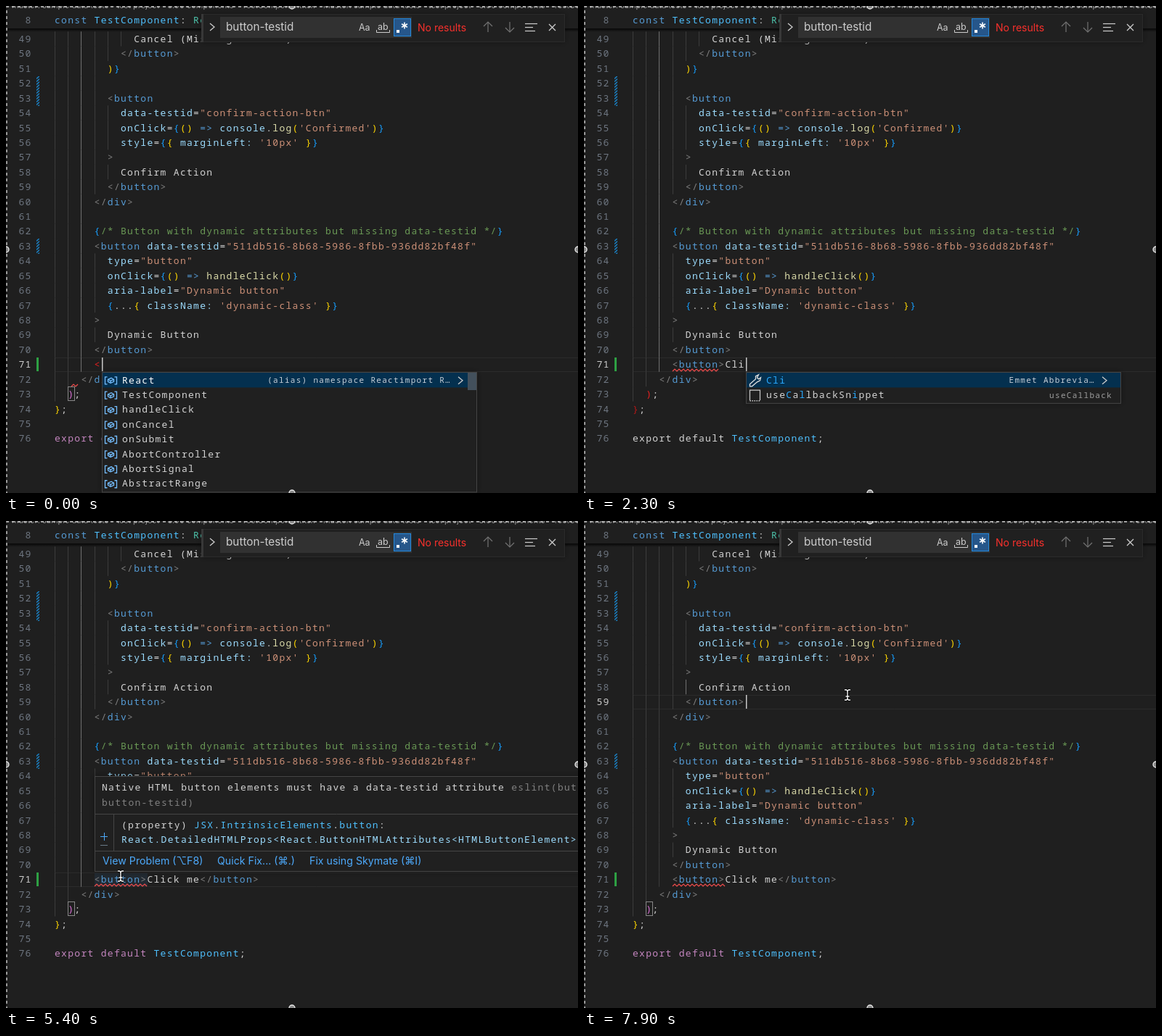
Animation of 788x672 px, one loop 8000 ms. Source, as an HTML page with a canvas:

```html
<!DOCTYPE html>
<html lang="en">
<head>
<meta charset="utf-8">
<title>Code editor</title>
<style>
  html, body { margin: 0; width: 788px; height: 672px; overflow: hidden; background: #1f1f1f; }
  canvas { display: block; }
</style>
</head>
<body>
<canvas id="stage" width="788" height="672"></canvas>
<script>
const ctx = document.getElementById('stage').getContext('2d');
const LEFT = 67, CW = 9.1, LH = 20.42, LOOP = 8000;
const MONO = '"Noto Sans Mono", "DejaVu Sans Mono", monospace';
const SANS = 'Inter, "Open Sans", "DejaVu Sans", sans-serif';
const INK = {
  g: '#808080', b: '#569cd6', a: '#9cdcfe', s: '#ce9178', w: '#d4d4d4', f: '#dcdcaa',
  y: '#ffd700', p: '#da70d6', u: '#179fff', c: '#6a9955', t: '#4ec9b0', v: '#4fc1ff',
  k: '#c586c0', r: '#e82020', d: '#b81818', h: '#2aaaff', n: '#6e7681', x: '#ffffff'
};
const colX = col => LEFT + col * CW;
const lineY = n => 45.3 + (n - 49) * LH;

// A tilde and a letter switch the ink; each entry is [indent, marked text].
const BUTTON_END = '~g</~bbutton~g>';
const CODE = {
  49: [12, '~wCancel (Missing test id)'],
  50: [10, BUTTON_END],
  51: [8, '~y)~u}'],
  52: [8, ''],
  53: [8, '~g<~bbutton'],
  54: [10, '~adata-testid~w=~s"confirm-action-btn"'],
  55: [10, "~aonClick~w=~u{~y() ~b=> ~aconsole~w.~flog~y(~s'Confirmed'~y)~u}"],
  56: [10, "~astyle~w=~u{~y{ ~amarginLeft: ~s'10px' ~y}~u}"],
  57: [8, '~g>'],
  58: [10, '~wConfirm Action'],
  59: [8, BUTTON_END],
  60: [6, '~g</~bdiv~g>'],
  61: [6, ''],
  62: [6, '~u{~c/* Button with dynamic attributes but missing data-testid */~u}'],
  63: [6, '~g<~bbutton ~adata-testid~w=~s"511db516-8b68-5986-8fbb-936dd82bf48f"'],
  64: [8, '~atype~w=~s"button"'],
  65: [8, '~aonClick~w=~u{~y() ~b=> ~fhandleClick~y()~u}'],
  66: [8, '~aaria-label~w=~s"Dynamic button"'],
  67: [8, "~u{~w...~y{ ~aclassName: ~s'dynamic-class' ~y}~u}"],
  68: [6, '~g>'],
  69: [8, '~wDynamic Button'],
  70: [6, BUTTON_END],
  71: [6, ''],
  72: [4, '~g</~bdiv~g>'],
  73: [2, '~p)~w;'],
  74: [0, '~y}~w;'],
  75: [0, ''],
  76: [0, '~kexport default ~vTestComponent~w;']
};
const BROKEN_TAG = { 72: '~b</~rdiv~b>', 73: '~p)~r;', 74: '~y}~r;', 76: '~wexport default ~vTestComponent~r;' };
const OPEN_TAG = { 73: '~r)~w;', 74: '~d}~w;', 76: '~wexport default ~vTestComponent~w;' };

// Completion rows: [icon, marked label, detail].
const symbols = names => names.split(' ').map(s => ['symbol', '~w' + s, '']);
const GLOBALS = symbols('React TestComponent handleClick onCancel onSubmit AbortController AbortSignal AbstractRange');
const B_TAGS = 'utton ase di do ig lockquote ody r'.split(' ').map(s => ['cube', '~hb~w' + s, '']);
B_TAGS[0][2] = '(property) JSX.IntrinsicElements.button…';
const buttonRows = n => [
  ['cube', '~h' + 'button'.slice(0, n) + '~x' + 'button'.slice(n), '(property) JSX.IntrinsicElements.button…'],
  ['symbol', '~wGamepad~h' + 'Button'.slice(0, n) + '~w' + 'Button'.slice(n), '']
];
const emmet = s => ['wrench', '~h' + s, 'Emmet Abbrevia…'];
const SNIPPET = ['snippet', '~wuse~hC~wa~hl~wlbackSn~hi~wppet', 'useCallback'];
const withDetail = s => [['symbol', '~xReact', s], ...GLOBALS.slice(1)];

const TAG = '~g<~bbutton', OPEN = TAG + '~g>~w';
// [time, text of the edited line, completion rows]
const KEYS = [
  [0, '~r<', withDetail('(alias) namespace Reactimport R…')],
  [200, '~g<~bb', B_TAGS],
  [400, '~g<~bbu', buttonRows(2)],
  [500, '~g<~bbut', buttonRows(3)],
  [600, '~g<~bbutt', buttonRows(4)],
  [700, '~g<~bbutto', buttonRows(5)],
  [900, TAG, buttonRows(6)],
  [1200, OPEN],
  [1500, OPEN + 'C', [emmet('C'), SNIPPET]],
  [1600, OPEN + 'Cl', [emmet('Cl'), SNIPPET]],
  [1800, OPEN + 'Cli', [emmet('Cli'), SNIPPET]],
  [2700, OPEN + 'Clic'],
  [2800, OPEN + 'Click', [emmet('Click')]],
  [2900, OPEN + 'Click '],
  [3000, OPEN + 'Click m', [emmet('m')]],
  [3100, OPEN + 'Click me', [emmet('me')]],
  [3200, OPEN + 'Click me~r<', withDetail('(alias) namespace Reactimport React')],
  [3500, OPEN + 'Click me~r</', [['wrench', '~x/button', '']]],
  [3700, OPEN + 'Click me' + BUTTON_END]
];
const MOUSE = [
  [4300, 330, 360], [4600, 158, 454], [4900, 158, 490], [5700, 158, 490], [6000, 225, 455],
  [6400, 331, 389], [7200, 380, 372], [7500, 366, 290], [7700, 363, 240], [8000, 363, 240]
];
const CLICK = 7700, HOVER = [5200, 7400];

function rect(x, y, w, h, fill, stroke) {
  ctx.fillStyle = fill;
  ctx.fillRect(x, y, w, h);
  if (stroke) {
    ctx.strokeStyle = stroke;
    ctx.lineWidth = 1;
    ctx.strokeRect(x + .5, y + .5, w - 1, h - 1);
  }
}
function path(points, color, width = 1, closed = false) {
  ctx.beginPath();
  for (let i = 0; i < points.length; i += 2) ctx.lineTo(points[i], points[i + 1]);
  if (closed) ctx.closePath();
  ctx.strokeStyle = color;
  ctx.lineWidth = width;
  ctx.stroke();
}
function at(x, y, draw) {
  ctx.save();
  ctx.translate(x, y);
  draw();
  ctx.restore();
}
function label(s, x, y, color, size, family = SANS) {
  const mono = family === MONO;
  ctx.font = `${mono ? 500 : 400} ${size}px ${family}`;
  ctx.letterSpacing = mono ? '1.3px' : '0px';
  ctx.fillStyle = color;
  ctx.fillText(s, x, y);
}
const plain = s => s.replace(/~./g, '');
function code(s, x, y) {
  let col = 0;
  for (const part of s.split('~').slice(1)) {
    label(part.slice(1), x + col * CW, y + 4.7, INK[part[0]], 13, MONO);
    col += part.length - 1;
  }
}
function shadowed(draw) {
  ctx.save();
  ctx.shadowColor = 'rgba(0,0,0,.36)';
  ctx.shadowBlur = 8;
  draw();
  ctx.restore();
}
function squiggle(x1, x2, y) {
  const pts = [];
  for (let x = x1, i = 0; x <= x2; x += 3, i++) pts.push(x, y + (i % 2 ? -1.5 : 1.5));
  path(pts, '#f14c4c', 1.2);
}
const chevron = (x, y) => path([x - 3, y - 5, x + 3, y, x - 3, y + 5], '#cccccc', 1.3);

function cube(s, color) {
  path([-8 * s, -3 * s, s, -7 * s, 8 * s, -3 * s, 8 * s, 3 * s, -s, 7 * s, -8 * s, 3 * s], color, 1.3, true);
  path([-8 * s, -3 * s, -s, s, 8 * s, -3 * s], color, 1.3);
  path([-s, s, -s, 7 * s], color, 1.3);
}
const ICONS = {
  symbol() {
    path([-5, -5, -8, -5, -8, 5, -5, 5], '#75beff', 1.3);
    path([5, -5, 8, -5, 8, 5, 5, 5], '#75beff', 1.3);
    cube(.5, '#75beff');
  },
  cube() { cube(1, '#e0e0e0'); },
  wrench() {
    path([-7, 5, 1, -2, 1, -6, 5, -8, 3, -4, 5, -2, 8, -4, 7, 0, 3, 2, -4, 8, -7, 8], '#e0e0e0', 1.3, true);
  },
  snippet() {
    path([-7, 7, -7, -7, 7, -7, 7, 7], '#cccccc', 1.2);
    ctx.setLineDash([1.5, 1.5]);
    path([-7, 7.5, 7, 7.5], '#cccccc', 1.5);
  }
};

function completions(x, rows) {
  const width = 517, long = rows.length > 2, y0 = 505;
  shadowed(() => rect(x, y0, width, rows.length * LH + 3, '#202020'));
  rect(x, y0, width, rows.length * LH + 3, '#202020', '#454545');
  rect(x + 1, y0 + 1, width - 2, LH, '#04304f');
  if (long) rect(x + width - 13, y0 + 1, 12, 24, '#43505c');
  rows.forEach(([icon, text, detail], i) => {
    const y = 515.8 + i * LH;
    at(x + 12.5, y + 1, ICONS[icon]);
    code(text, x + 28, y);
    if (!detail) return;
    const wide = detail.endsWith('React');
    const right = x + width - (i ? 12 : wide ? 13 : 36);
    label(detail, right - detail.length * 7.9, y + 4.4, i ? '#9d9d9d' : '#c8d0d8', 11, MONO);
    if (!i && !wide) chevron(x + width - 23, y + 1);
  });
}

function hoverCard() {
  shadowed(() => rect(122, 352, 700, 132, '#202020'));
  rect(122, 352, 700, 132, '#202020', '#454545');
  code('~wNative HTML button elements must have a data-testid attribute ~geslint(button', 132, 367.5);
  code('~gbutton-testid)', 132, 388);
  for (const y of [404.5, 455.5]) path([123, y, 788, y], '#454545');
  path([148.5, 405, 148.5, 455], '#454545');
  path([130, 435.5, 140, 435.5], '#4daafc');
  path([135.5, 430, 135.5, 441], '#4daafc');
  path([130, 447.5, 140, 447.5], '#6a7a88');
  code('~w(property) ~vJSX~w.~vIntrinsicElements~w.~vbutton~w:', 159, 419.5);
  code('~aReact.DetailedHTMLProps<React.ButtonHTMLAttributes<HTMLButtonElement>', 159, 439.5);
  [['View Problem (⌥F8)', 133], ['Quick Fix... (⌘.)', 291], ['Fix using Skymate (⌘I)', 418]]
    .forEach(([s, x]) => label(s, x, 474, '#4daafc', 14.2));
}

function editor(line71, mode, active, caretCol, caretOn) {
  const y = lineY(active), changes = mode === 1 ? BROKEN_TAG : mode === 2 ? OPEN_TAG : {};
  for (const edge of [-9.5, 9.5]) {
    const ey = Math.round(y + edge) + .5;
    path([LEFT, ey, 788, ey], '#2b2b2b');
  }
  for (let n = 49; n <= 76; n++) {
    const [indent, text] = CODE[n], ly = lineY(n);
    for (let col = 0; col < indent; col += 2) {
      const lit = active === 71 ? col === 4 : col === 8 && n === 58;
      const gx = Math.round(colX(col)) + .5;
      path([gx, ly - LH / 2, gx, ly + LH / 2], lit ? '#707070' : '#3c3c3c');
    }
    label(n, 17.5, ly + 4.7, n === active ? '#cccccc' : INK.n, 13, MONO);
    code(n === 71 ? line71 : changes[n] || text, colX(indent), ly);
  }
  if (mode !== 2) {
    ctx.strokeStyle = '#888888';
    ctx.lineWidth = 1;
    ctx.strokeRect(85.5, 525.5, 9, 19);
  }
  if (caretOn) rect(Math.round(colX(caretCol)) + 1, y - 9.5, 1.5, 19, '#c8c8c8');

  rect(42, 485, 3, 19, '#2ea043');
  for (const [top, h] of [[97, 41], [321, 21]]) {
    ctx.save();
    ctx.beginPath();
    ctx.rect(42, top, 4, h);
    ctx.clip();
    for (let k = top; k < top + h + 6; k += 4) path([41, k, 47, k - 5], '#1b81c4', 1.5);
    ctx.restore();
  }
}

function header() {
  rect(0, 0, 788, 32, '#1f1f1f');
  const shade = ctx.createLinearGradient(0, 31, 0, 36);
  shade.addColorStop(0, 'rgba(0,0,0,.75)');
  shade.addColorStop(1, 'rgba(0,0,0,0)');
  rect(0, 31, 788, 5, shade);
  label(8, 26.6, 24.3, INK.n, 13, MONO);
  code('~bconst ~vTestComponent~w: ~tRe', LEFT, 19.6);
}

function findBox() {
  shadowed(() => rect(269, 11, 501, 39, '#202020'));
  rect(269, 11, 501, 39, '#202020', '#2b2b2b');
  rect(269, 11, 3, 39, '#383838');
  chevron(284, 29);
  rect(295, 15, 264, 29, '#313131');
  label('button-testid', 303, 34, '#cccccc', 15.3);
  label('Aa', 486, 34, '#cccccc', 12.5);
  label('ab', 512, 33, '#cccccc', 12.5);
  path([510.5, 33, 510.5, 36.5, 528.5, 36.5, 528.5, 33], '#cccccc');
  rect(534, 17, 24, 25, '#26568a', '#2488db');
  rect(538, 33, 4, 4, '#ffffff');
  for (let i = 0; i < 3; i++) {
    const dx = 4.5 * Math.sin(i * Math.PI / 3), dy = 4.5 * Math.cos(i * Math.PI / 3);
    path([549 - dx, 27 - dy, 549 + dx, 27 + dy], '#ffffff', 1.6);
  }
  label('No results', 567, 35, '#f8302c', 14);
  for (const [x, d] of [[664, -1], [694, 1]]) {
    path([x, 29 - 7 * d, x, 29 + 7 * d], '#737373', 1.2);
    path([x - 6, 29 + d, x, 29 + 7 * d, x + 6, 29 + d], '#737373', 1.2);
  }
  [[24.5, 732], [29.5, 726], [34.5, 729]].forEach(([y, x]) => path([715, y, x, y], '#cccccc', 1.2));
  path([748, 25, 757, 34], '#cccccc', 1.2);
  path([757, 25, 748, 34], '#cccccc', 1.2);
}

function selection() {
  const cut = 'master: sample data tests - test project - 3.90 components - TestComponent.tsx - ';
  label(cut.repeat(2), 8, 2.5, '#9a9a9a', 11);
  ctx.setLineDash([4, 4]);
  path([788, 1, 1, 1, 1, 672], '#c8c8c8', 1.4);
  ctx.setLineDash([]);
  for (const [x, y] of [[0, 336], [788, 336], [394, 0], [394, 672]]) {
    ctx.beginPath();
    ctx.arc(x, y, 4, 0, 7);
    ctx.fillStyle = '#8a8a8a';
    ctx.fill();
    ctx.strokeStyle = '#e8e8e8';
    ctx.lineWidth = 1.3;
    ctx.stroke();
  }
}

function pointer(t, hovering) {
  const i = MOUSE.findIndex(m => m[0] > t);
  if (i < 1) return;
  const [t0, x0, y0] = MOUSE[i - 1], [t1, x1, y1] = MOUSE[i];
  const k = (t - t0) / (t1 - t0), x = x0 + (x1 - x0) * k, y = y0 + (y1 - y0) * k;
  at(x, y, () => {
    if (hovering && y > 352 && y < 484) {
      path([0, 0, 0, 14, 3, 11, 5.5, 16, 8, 15, 5.5, 10, 10, 10], '#ffffff', 1.5, true);
      ctx.fillStyle = '#111111';
      ctx.fill();
      return;
    }
    for (const [color, w] of [['#000000', 3.5], ['#ffffff', 1.4]]) {
      path([-4, -7, -1.5, -7, 0, -5.5, 1.5, -7, 4, -7], color, w);
      path([-4, 7, -1.5, 7, 0, 5.5, 1.5, 7, 4, 7], color, w);
      path([0, -6, 0, 6], color, w);
      path([-2.5, 2, 2.5, 2], color, w);
    }
  });
}

function draw(t) {
  const [since, text, rows] = KEYS.filter(k => k[0] <= t).pop();
  const clicked = t >= CLICK;
  const mode = t < 200 ? 0 : t < 1200 ? 1 : t < 3700 ? 2 : 3;
  const hovering = t >= HOVER[0] && t < HOVER[1];
  const caretCol = clicked ? 17 : 6 + plain(text).length;
  const caretOn = (t - (clicked ? CLICK : since)) % 1000 <= 500;

  rect(0, 0, 788, 672, '#1f1f1f');
  if (hovering) rect(122, 485, 73, 19, '#222a32');
  editor(text, mode, clicked ? 59 : 71, caretCol, caretOn);
  if (mode === 0 || t >= 3200 && mode === 2) squiggle(90, 99, 523.5);
  if (mode === 1) squiggle(90, 122, 523.5);
  if (mode >= 2) squiggle(122, mode === 2 ? 187 : 194, 502.5);
  if (rows) completions(Math.round(colX(caretCol)) + 1, rows);
  if (hovering) hoverCard();
  header();
  findBox();
  selection();
  pointer(t, hovering);
}

const start = performance.now();
function tick() {
  const t = (performance.now() - start) % LOOP;
  draw(Math.floor(t / 100) * 100);
  requestAnimationFrame(tick);
}
tick();
</script>
</body>
</html>
```
